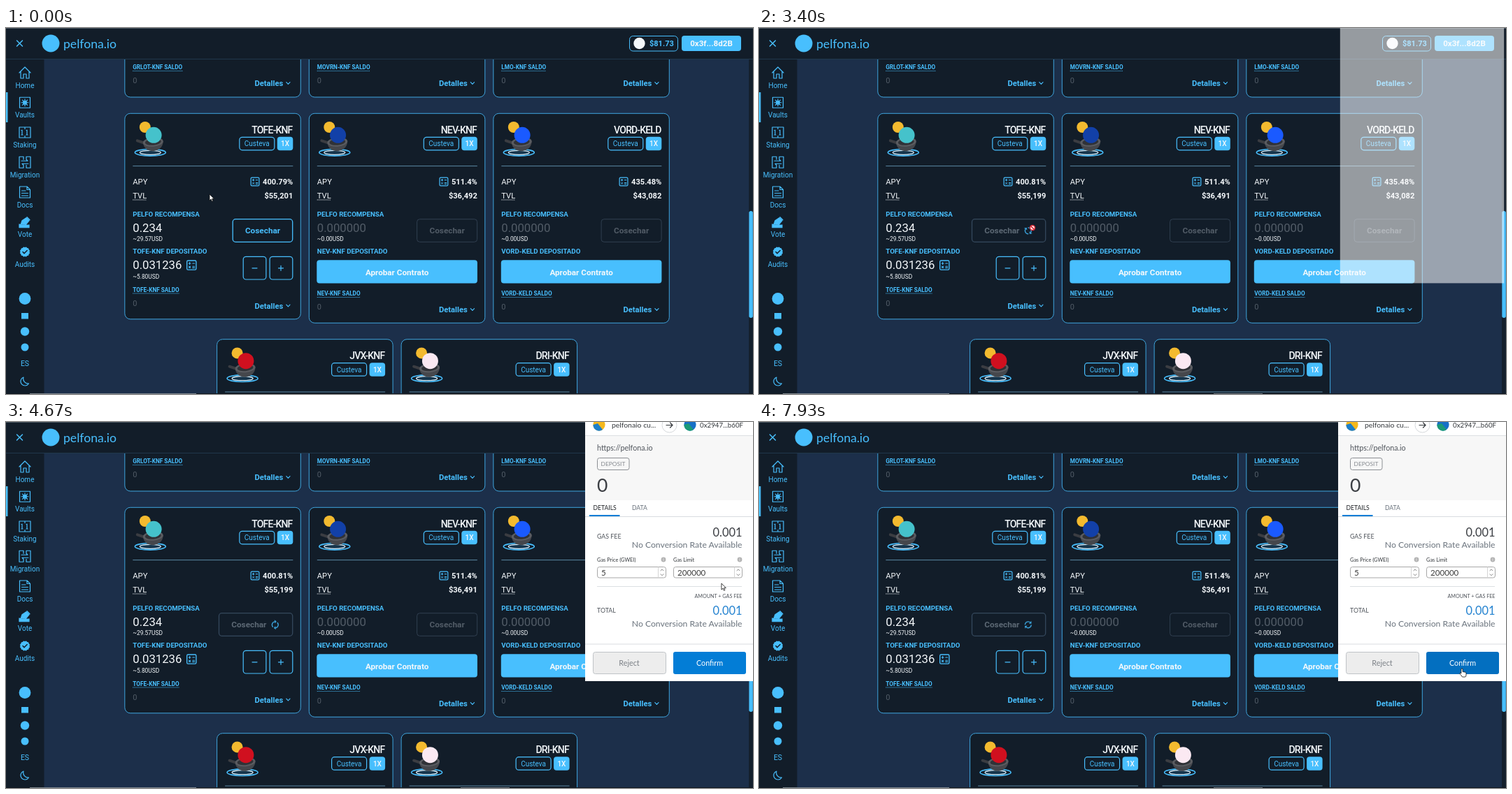
These frames come from a looping animation (1068x524 px, 8 s). An HTML page:

```html
<!DOCTYPE html>
<html lang="es">
<head>
<meta charset="utf-8">
<title>Vaults</title>
<style>
  html, body { margin: 0; width: 100%; height: 100%; overflow: hidden; background: #1c2f4a; }
  svg { display: block; width: 1068px; height: 524px; }
  text { font-family: Roboto, sans-serif; white-space: pre; }
  #popup text, #brand { font-family: Lato, sans-serif; }
</style>
</head>
<body>
<svg id="stage" viewBox="0 0 1068 524" xmlns="http://www.w3.org/2000/svg"></svg>
<script>
const ACCENT = '#48bffe', PANEL = '#121d29', WHITE = '#f4f8fb', DIM = '#525c67';
const LOOP = 8000, STEP = 1000 / 15;
const pen = document.createElement('canvas').getContext('2d');

// Markup helpers
const attrs = o => Object.entries(o).map(([k, v]) => ` ${k}="${v}"`).join('');
const tag = (name, o, inner = '') => `<${name}${attrs(o)}>${inner}</${name}>`;
const text = (x, y, str, size, fill, o = {}) => tag('text', { x, y, 'font-size': size, fill, ...o }, str);
const BOLD = { 'font-weight': 700 }, END = { 'text-anchor': 'end' }, MID = { 'text-anchor': 'middle' };
const BOLD_END = { ...BOLD, ...END }, BOLD_MID = { ...BOLD, ...MID };
const box = (x, y, w, h, r, fill, stroke = 'none', o = {}) =>
  tag('rect', { x, y, width: w, height: h, rx: r, fill, stroke, ...o });
const disc = (cx, cy, r, fill, o = {}) => tag('circle', { cx, cy, r, fill, ...o });
const oval = (cx, cy, rx, ry, fill, o = {}) => tag('ellipse', { cx, cy, rx, ry, fill, ...o });
const line = (d, stroke = ACCENT, w = 1.2, o = {}) =>
  tag('path', { d, fill: 'none', stroke, 'stroke-width': w, 'stroke-linecap': 'round', 'stroke-linejoin': 'round', ...o });
const rule = (x1, x2, y, stroke, o = {}) => tag('path', { d: `M${x1} ${y}H${x2}`, stroke, 'stroke-width': 1, ...o });
const at = (x, y, inner, o = {}) => tag('g', { transform: `translate(${x} ${y})`, ...o }, inner);

function widthOf(str, size, weight) {
  pen.font = `${weight} ${size * 10}px Roboto, sans-serif`;
  return pen.measureText(str).width / 10;
}

function dotted(x, y, str, size, fill, weight) {
  const end = x + widthOf(str, size, weight);
  return text(x, y, str, size, fill, { 'font-weight': weight }) +
    rule(x, end, y + 2.5, fill, { 'stroke-dasharray': '1 1' });
}

const calcIcon = (x, y, s = 1) => tag('g', { transform: `translate(${x} ${y}) scale(${s})` },
  box(0.6, 0.6, 11.8, 11.8, 1.5, 'none', ACCENT, { 'stroke-width': 1.2 }) +
  line('M2.8 4.2H5.4M4.1 2.9V5.5M7.8 4.2H10.4M3.1 7.9L5.1 9.9M5.1 7.9L3.1 9.9M7.8 8H10.4M7.8 9.9H10.4', ACCENT, 1));

// Page parts
function pan(x, y, color) {
  return at(x, y,
    oval(36.5, 56, 22, 4.8, 'none', { stroke: ACCENT, 'stroke-width': 1.6 }) +
    oval(36.5, 56, 15, 3, '#16354c', { stroke: '#d8f1ff', 'stroke-width': 1.2 }) +
    line('M18 39L30 43', '#3b3d42', 4) +
    tag('path', { d: 'M26 42Q28 54 41 54Q54 52 55 40Z', fill: '#45474c' }) +
    oval(40.5, 41, 14.5, 6.5, '#5a5c61', { transform: 'rotate(-5 40 41)' }) +
    oval(40.5, 41, 11.5, 4.5, '#303237', { transform: 'rotate(-5 40 41)' }) +
    disc(29, 19.7, 8, '#f3ba2f') + disc(41.3, 31, 11.5, color));
}

const frame = (x, y, h) => box(x, y, 251.5, h, 8, PANEL, '#3fa6df', { 'stroke-width': 1 });

function cardHead(x, y, pair, color) {
  const r = x + 240.5;
  return pan(x, y, color) +
    text(r - 0.8, y + 28.3, pair, 14, WHITE, { ...END, 'font-weight': 500, 'letter-spacing': -0.8 }) +
    box(x + 164, y + 34, 50, 18.5, 4, 'none', ACCENT, { 'stroke-width': 1.2 }) +
    text(x + 189, y + 47, 'Custeva', 10, ACCENT, MID) +
    box(x + 218, y + 33.5, 22.5, 19.5, 4, ACCENT) +
    text(x + 229.3, y + 47, '1X', 10, WHITE, { ...MID, 'font-weight': 500 }) +
    rule(x + 11.5, r, y + 75.3, '#5a87a3');
}

const cardFoot = (x, y, pair) =>
  dotted(x + 11.5, y, pair + ' SALDO', 8.2, ACCENT, 700) +
  text(x + 11.5, y + 20, '0', 11, DIM) +
  text(x + 185.6, y + 24, 'Detalles', 11.2, ACCENT, BOLD) +
  line(`M${x + 231} ${y + 18.7}l2.6 2.6l2.6 -2.6`);

function cardBody(x, n, token, apy, tvl, reward, usd, fill) {
  const l = x + 11.5, r = x + 240.5;
  return text(l, 224, 'APY', 11.2, WHITE) +
    calcIcon(r - widthOf(apy, 11.1, 700) - 17.5, 213.5) +
    text(r, 224, apy, 11.1, WHITE, { ...BOLD_END, id: 'apy' + n }) +
    dotted(l, 243.5, 'TVL', 11.2, WHITE, 400) +
    text(r, 243.5, tvl, 11.1, WHITE, { ...BOLD_END, id: 'tvl' + n }) +
    text(l, 269.7, 'PELFO RECOMPENSA', 9.7, ACCENT, BOLD) +
    text(l, 291.7, reward, 16.7, fill) +
    text(l, 305, usd, 8.4, WHITE) +
    text(l, 323, token + ' DEPOSITADO', 9.7, ACCENT, BOLD);
}

function lockedCard(x, n, pair, color, apy, tvl) {
  return frame(x, 122.3, 300) + cardHead(x, 122.3, pair, color) +
    cardBody(x, n, pair, apy, tvl, '0.000000', '~0.00USD', DIM) +
    box(x + 154.3, 273.7, 86, 32.6, 4, 'none', '#303f50') +
    text(x + 197.3, 294.2, 'Cosechar', 11.8, DIM, BOLD_MID) +
    box(x + 11, 332.2, 229.6, 33.4, 4, ACCENT) +
    text(x + 125.8, 353.5, 'Aprobar Contrato', 11.7, WHITE, BOLD_MID) +
    cardFoot(x, 383, pair);
}

function openCard(x) {
  const pair = 'TOFE-KNF';
  const square = bx => box(bx, 327.3, 32.7, 32.7, 4, 'none', ACCENT, { 'stroke-width': 1.2 });
  return frame(x, 122.3, 294.5) + cardHead(x, 122.3, pair, '#45c2cb') +
    cardBody(x, 1, pair, '400.79%', '$55,201', '0.234', '~29.57USD', WHITE) +
    box(324.2, 273.7, 85.5, 32.6, 4, 'none', ACCENT, { id: 'claim', 'stroke-width': 1.3 }) +
    text(367, 294.2, 'Cosechar', 11.8, ACCENT, { ...BOLD_MID, id: 'claimText' }) +
    tag('g', { id: 'refresh' },
      line('M-4.3 -1A4.4 4.4 0 0 1 3.6 -2.5M4.3 1A4.4 4.4 0 0 1 -3.6 2.5', '#3a9fd6', 1.4) +
      tag('path', { d: 'M5 -5V-1.2H1.2ZM-5 5V1.2H-1.2Z', fill: '#3a9fd6' })) +
    text(x + 11.5, 345, '0.031236', 16.7, WHITE) + calcIcon(258, 332.3, 1.12) +
    text(x + 11.5, 358.5, '~5.80USD', 8.4, WHITE) +
    square(339.2) + square(377.1) + line('M352 343.8H359M389.5 343.8H396.5M393 340.3V347.3') +
    cardFoot(x, 377.5, pair);
}

const menuIcons = [
  ['Home', 'M-8 0L0 -8L8 0M-6 -1.5V8H-2V2H2V8H6V-1.5'],
  ['Vaults', 'M-7.5 -7.5H7.5V7.5H-7.5ZM-2.5 0A2.5 2.5 0 1 0 2.5 0A2.5 2.5 0 1 0 -2.5 0M-5 0H5M0 -5V5M-3.6 -3.6L3.6 3.6M3.6 -3.6L-3.6 3.6'],
  ['Staking', 'M-8 -7.5H8V7.5H-8ZM-4 -3.5V3.5M-5 -3H-4M-5 3.5H-3M3 -3.5V3.5M2 -3H3M2 3.5H4M0 -7.5V-5M0 5V7.5'],
  ['Migration', 'M-2 -4V-8H-8V8H-2V4M2 -4V-8H8V8H2V4M-5 -2H4L2 -4M5 2H-4L-2 4'],
  ['Docs', 'M-7.5 -8H3L7.5 -3.5V8H-7.5ZM3 -8V-3.5H7.5M-4.5 -2H1M-4.5 1.5H4.5M-4.5 5H4.5'],
  ['Vote', 'M-8 3V8H6V4M-6 4L-4 -2L2 -6L6 -2L1 4ZM3 -7L7 -3'],
  ['Audits', '']
];

function sidebar() {
  const rows = menuIcons.map(([label, d], i) => {
    const y = 64 + i * 42.75;
    const seal = i < 6 ? line(d, ACCENT, 1.2, i === 5 ? { fill: ACCENT } : {}) :
      [0, 30, 60].map(a => box(-5.5, -5.5, 11, 11, 1.5, ACCENT, 'none', { transform: `rotate(${a})` })).join('') +
      line('M-3 0L-1 2.2L3.2 -2', PANEL, 1.5);
    return at(27, y, seal) + text(27, y + 21.6, label, 10, ACCENT, MID);
  }).join('');
  return box(0, 44, 54.5, 480, 0, PANEL) + box(0, 92, 2.5, 43, 0, ACCENT) + rows +
    disc(27, 387.5, 8.4, ACCENT) + box(22, 408, 10, 8.5, 0, ACCENT) +
    disc(27, 434.5, 6.2, ACCENT) + disc(27, 457, 5.5, ACCENT) +
    text(27, 483.7, 'ES', 10.5, ACCENT, MID) +
    line('M25 500A6.2 6.2 0 1 0 32.5 509A7 7 0 0 1 25 500Z');
}

const header = () =>
  box(0, 0, 1068, 44, 0, PANEL) + rule(0, 1068, 44.5, '#20384c') + rule(0, 1068, 0.5, '#46525d') +
  line('M15.5 18L23.5 26M23.5 18L15.5 26', ACCENT, 1.5) +
  disc(64, 22, 12.5, ACCENT) +
  text(82, 28.5, 'pelfona.io', 17.6, ACCENT, { id: 'brand' }) +
  box(891.5, 11.5, 69, 21.5, 5, 'none', ACCENT) + disc(905.5, 22, 8.2, WHITE) +
  text(920, 26, '$81.73', 11, ACCENT, BOLD) +
  box(966, 11, 85, 22, 4, ACCENT) +
  text(1008.5, 26, '0x3f...8d2B', 11.6, WHITE, BOLD_MID);

function page() {
  const cols = [169.8, 433.3, 696.8];
  const top = ['GRLOT-KNF', 'MOVRN-KNF', 'LMO-KNF'];
  return box(0, 0, 1068, 524, 0, '#1c2f4a') +
    cols.map((x, i) => frame(x, -40, 139) + cardFoot(x, 59, top[i])).join('') +
    openCard(cols[0]) +
    lockedCard(cols[1], 2, 'NEV-KNF', '#1240a8', '511.4%', '$36,492') +
    lockedCard(cols[2], 3, 'VORD-KELD', '#1a5aff', '435.48%', '$43,082') +
    frame(301.6, 445.7, 120) + cardHead(301.6, 445.7, 'JVX-KNF', '#d0101f') +
    frame(565.1, 445.7, 120) + cardHead(565.1, 445.7, 'DRI-KNF', '#fbe9f2') +
    box(1062, 44, 6, 480, 0, '#14202d') + box(1062.3, 262, 5.5, 153, 2.7, ACCENT) +
    sidebar() + header() +
    rule(0, 1068, 523.5, '#0e151d') + rule(34, 272, 523.5, '#7d858c') +
    rule(650, 720, 523.5, '#6a747c', { id: 'task' });
}

// Wallet window
function avatar(x, a, b) {
  return disc(x, 4, 8.6, a) +
    tag('path', { d: `M${x - 8.6} 4A8.6 8.6 0 0 0 ${x + 5} 11L${x - 2} 2Z`, fill: b });
}

function gasField(x, label, value) {
  return text(x, 199.5, label, 7.4, '#33373b') + disc(x + 95, 197, 3.4, '#b4b4b4') +
    text(x + 95, 199.2, 'i', 6, '#fff', MID) +
    box(x + 0.5, 207.5, 98, 15.5, 3, '#fff', '#a8a8a8') +
    text(x + 6, 219.5, value, 11.6, '#3c3c3c') +
    tag('path', { d: `M${x + 87.5} 207.5V223`, stroke: '#d4d4d4' }) +
    line(`M${x + 91} 212.8l2 -2l2 2M${x + 91} 217.8l2 2l2 -2`, '#777', 0.9);
}

const popup = () => tag('g', { id: 'popup' },
  box(828, -20, 240, 391, 0, '#fff') +
  tag('g', { id: 'loading' }, disc(949.5, 134, 50, '#e17726') +
    tag('g', { id: 'ring' }, line('M3.5 -6.6A7.5 7.5 0 1 0 4.5 6', '#e08a2e', 2.6, { 'stroke-linecap': 'butt' }))) +
  tag('g', { id: 'details' },
    avatar(848, '#f5b81c', '#1d7fc9') + text(866, 8, 'pelfonaio cu...', 10.4, '#33373b') +
    rule(828, 1068, 19.5, '#dcdfe2') + box(828, 20, 240, 92, 0, '#f7f7f7') +
    disc(948.5, 4.5, 10.5, '#fff', { stroke: '#d5d8db' }) + line('M944 4.5H953M949.5 1L953 4.5L949.5 8', '#33373b', 1.2) +
    avatar(978, '#1770c6', '#1c9a78') + text(1054, 8, '0x2947...b60F', 9.7, '#33373b', END) +
    text(845, 40.5, 'https://pelfona.io', 10.7, '#50555c') +
    box(845.5, 51.5, 45.5, 17, 3, 'none', '#8c8f94') + text(868, 63, 'DEPOSIT', 8.4, '#84888e', MID) +
    text(845, 100.3, '0', 26.5, '#3c3f44') +
    text(839.5, 125.5, 'DETAILS', 8.6, '#23262a') + text(895, 125.5, 'DATA', 8.6, '#6a737d') +
    rule(828, 1068, 135.5, '#d9dce0') + box(834, 133, 43.5, 2, 0, '#037dd6') +
    text(845, 167, 'GAS FEE', 8.8, '#50555c') +
    text(1052.5, 163.5, '0.001', 16.4, '#3c3f44', END) +
    text(1052.5, 180, 'No Conversion Rate Available', 12.2, '#6a737d', END) +
    gasField(845, 'Gas Price (GWEI)', '5') + gasField(954, 'Gas Limit', '200000') +
    rule(845, 1052, 235.5, '#dcdfe2') +
    text(1052.5, 252, 'AMOUNT + GAS FEE', 7.2, '#50555c', END) +
    text(845, 273, 'TOTAL', 8.8, '#50555c') +
    text(1052.5, 276, '0.001', 16.4, '#2583d0', END) +
    text(1052.5, 293, 'No Conversion Rate Available', 12.2, '#6a737d', END) +
    rule(828, 1068, 318, '#d9dce0') +
    box(839.5, 329.5, 104, 31, 3, '#ededed', '#bfc3c7') + text(891, 348.7, 'Reject', 10.8, '#7c8187', MID) +
    box(954, 329, 104, 32, 3, '#037dd6', 'none', { id: 'confirm' }) + text(1006, 348.7, 'Confirm', 10.8, '#fff', MID)));

const edge = { stroke: '#111', 'stroke-width': 0.8, 'stroke-linejoin': 'round' };
const pointer = () => tag('g', { id: 'pointer' },
  tag('path', { id: 'arrow', d: 'M0 0V9L2.1 7.1L3.5 10.3L5 9.6L3.6 6.6H6.4Z', fill: '#fff', ...edge }) +
  tag('path', { id: 'hand', d: 'M-1.1 1A1.1 1.1 0 0 1 1.1 1V4.5L4.8 5.2Q6 5.6 6 6.8V9Q6 11.5 4.8 12H.6Q-.8 10 -3 7.4Q-3.2 6 -2 6.3L-1.1 7Z', fill: '#fff', ...edge }) +
  tag('g', { id: 'deny' }, disc(0, -1, 3.5, '#fff', { stroke: '#d62a35', 'stroke-width': 1.6 }) + line('M-2.4 -3.4L2.4 1.4', '#d62a35', 1.5)));

document.getElementById('stage').innerHTML = page() + popup() + pointer();

const el = {};
document.querySelectorAll('[id]').forEach(node => { el[node.id] = node; });
const set = (id, o) => { for (const k in o) el[id].setAttribute(k, o[k]); };
const show = (id, on) => set(id, { visibility: on ? 'visible' : 'hidden' });

const path = [
  [0, 291, 238], [600, 291, 238], [1400, 357, 288], [1667, 391, 287], [3930, 391, 287],
  [4467, 977, 262], [4667, 1023, 231], [4930, 1025, 213], [5400, 1025, 213],
  [5930, 1011, 352], [6000, 1010, 352], [6200, 1005, 353], [LOOP, 1005, 353]
];

function pointerAt(t) {
  const i = path.findIndex(k => k[0] > t);
  const [t0, x0, y0] = path[i - 1], [t1, x1, y1] = path[i];
  const u = (t - t0) / (t1 - t0);
  return [x0 + (x1 - x0) * u, y0 + (y1 - y0) * u];
}

const inside = (x, y, l, t, r, b) => x >= l && x <= r && y >= t && y <= b;

function draw(time) {
  const t = Math.floor((time + 4) / STEP) * STEP % LOOP;
  const [x, y] = pointerAt(t);
  const clicked = t > 2460, wide = t > 2790, ready = t > 4525;
  const onClaim = inside(x, y, wide ? 304 : 324, 273, 410, 307);
  const onConfirm = ready && inside(x, y, 954, 329, 1058, 361);

  const later = t > 60;
  el.apy1.textContent = later ? '400.81%' : '400.79%';
  el.tvl1.textContent = later ? '$55,199' : '$55,201';
  el.tvl2.textContent = later ? '$36,491' : '$36,492';

  set('claim', {
    x: wide ? 304.5 : 324.2, width: wide ? 105.2 : 85.5,
    stroke: clicked ? '#34485c' : onClaim ? '#3a9bd0' : ACCENT
  });
  set('claimText', { x: wide ? 347.3 : 367, fill: clicked ? '#5d6975' : onClaim ? '#3784ae' : ACCENT });
  show('refresh', wide);
  show('task', clicked);
  set('refresh', { transform: `translate(384.8 290.3) rotate(${(t - 5965) * 0.18})` });

  // The window fades in while growing to full size
  const u = Math.min(1, Math.max(0, (t - 3267) / 333));
  const rest = (1 - u) ** 1.6;
  set('popup', {
    opacity: 1 - rest,
    transform: `translate(948 130) scale(${1 - 0.053 * rest}) translate(-948 -130)`
  });
  show('popup', u > 0);
  show('loading', t > 3450 && !ready);
  show('details', ready);
  set('ring', { transform: `translate(948.3 211) rotate(${(t - 3533) * 0.36})` });
  set('confirm', { fill: onConfirm ? '#036fc0' : '#037dd6' });

  set('pointer', { transform: `translate(${x} ${y})` });
  const deny = onClaim && clicked, hand = onConfirm || (onClaim && !clicked);
  show('deny', deny);
  show('hand', hand);
  show('arrow', !deny && !hand);
}

const start = performance.now();
function tick() {
  draw((performance.now() - start) % LOOP);
  requestAnimationFrame(tick);
}
tick();
</script>
</body>
</html>
```
